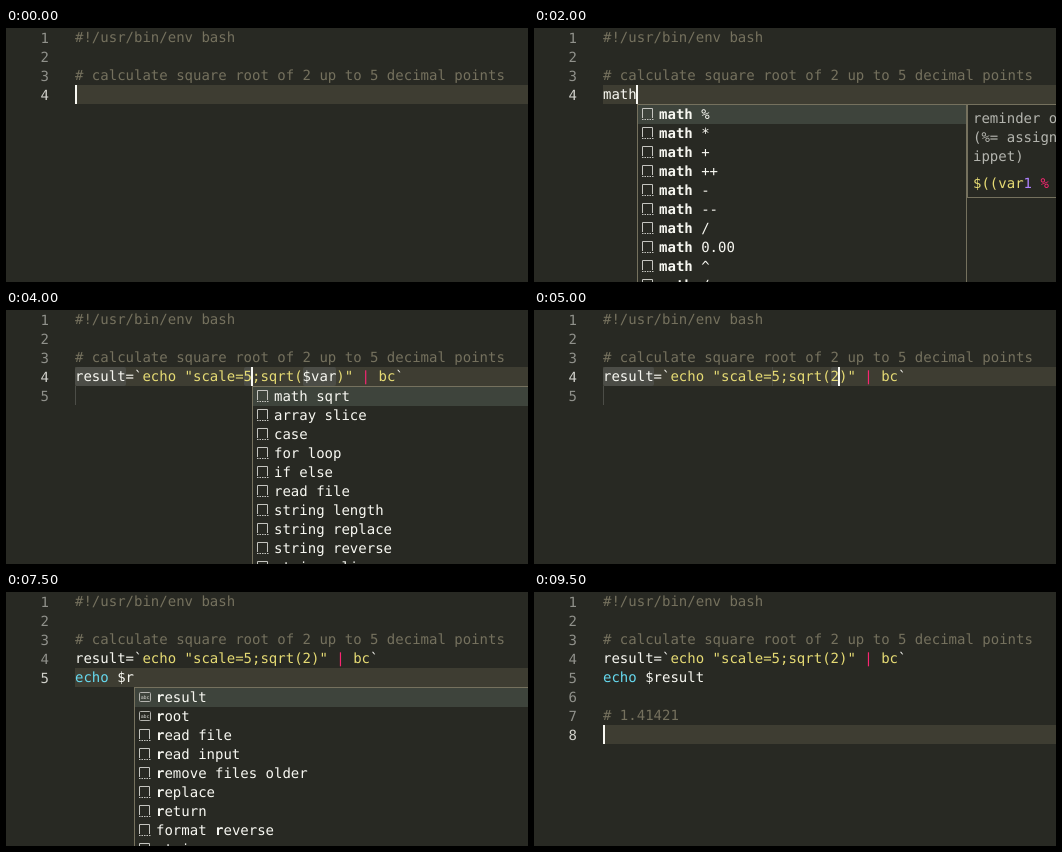
An HTML page for the animation above (10 s loop, 522x254 px).

```html
<!DOCTYPE html>
<html lang="en">
<head>
<meta charset="utf-8">
<title>Shell snippets in an editor</title>
<style>
html, body { margin: 0; width: 100%; height: 100%; overflow: hidden; background: #282923; }
svg { display: block; }
text { font: 14px "DejaVu Sans Mono", monospace; white-space: pre; text-rendering: geometricPrecision; }
</style>
</head>
<body>
<svg id="stage" width="522" height="254" viewBox="0 0 522 254"></svg>
<script>
const stage = document.getElementById('stage');
const LOOP = 10000, STEP = 500, ROW = 19, LEFT = 69, CHAR = 8.428;
const C = {
  bg: '#282923', line: '#3e3d32', white: '#f8f8f2', grey: '#75715e', num: '#90918b',
  active: '#d0d0ca', yellow: '#e6db74', pink: '#f92672', blue: '#66d9ef', purple: '#ae81ff',
  select: '#656660', field: '#4c4d47', pick: '#3e443c', border: '#75715e', hint: '#b4b5af'
};

const esc = s => s.replace(/&/g, '&amp;').replace(/</g, '&lt;');
const colX = n => LEFT + n * CHAR;
const rowY = n => (n - 1) * ROW;
const rect = (x, y, w, h, fill, extra = '') =>
  `<rect x="${x}" y="${y}" width="${w}" height="${h}" fill="${fill}" ${extra}/>`;
const frame = (x, y, w, h) =>
  rect(x + .5, y + .5, w - 1, h - 1, C.bg, `stroke="${C.border}"`);

// parts alternate: colour name, text, colour name, text ...
function text(x, y, parts) {
  let out = '';
  for (let i = 0; i < parts.length; i += 2) {
    out += `<tspan fill="${C[parts[i]]}">${esc(parts[i + 1])}</tspan>`;
  }
  return `<text x="${x}" y="${y}">${out}</text>`;
}

// Typed letters are bold, preferring the start of a word.
function boldMatch(label, typed) {
  const start = typed ? Math.max(0, label.search(new RegExp('\\b' + typed.slice(0, 2)))) : 0;
  let k = 0;
  return [...label].map((ch, i) =>
    i >= start && k < typed.length && ch === typed[k]
      ? (k++, `<tspan font-weight="700">${esc(ch)}</tspan>`) : esc(ch)).join('');
}

function icon(x, y, word) {
  if (word) {
    return `<rect x="${x + .5}" y="${y + .5}" width="11" height="9" rx="1" fill="none" stroke="#b5b5b0"/>` +
      `<text x="${x + 1.8}" y="${y + 7}" fill="#d0d0cb" style="font-size:5px;letter-spacing:-.2px">abc</text>`;
  }
  return `<path d="M${x + .5} ${y + 10}V${y + .5}H${x + 10.5}V${y + 10}" fill="none" stroke="#c5c5c0"/>` +
    `<path d="M${x} ${y + 11.5}H${x + 12}" stroke="#c5c5c0" stroke-dasharray="1.5 1"/>`;
}

// A label that starts with "@" is a plain word, the others are snippets.
function popup({ row, col, typed, items, width = 330, info }) {
  const x = Math.round(colX(col)), y = rowY(row + 1);
  let out = frame(x, y, width, items.length * ROW);
  out += rect(x + 1, y + 1, width - 2, ROW, C.pick);
  items.forEach((item, i) => {
    const word = item[0] === '@', top = y + i * ROW;
    out += icon(x + 5, top + (word ? 5 : 4), word) +
      `<text x="${x + 22}" y="${top + 15}" fill="${C.white}">${boldMatch(word ? item.slice(1) : item, typed)}</text>`;
  });
  if (info) {
    const px = x + width, n = info.about.length;
    out += frame(px, y, 330, n * ROW + 37);
    info.about.forEach((s, i) => { out += text(px + 6, y + 19 + i * ROW, ['hint', s]); });
    out += text(px + 6, y + 27 + n * ROW, info.code);
  }
  return out;
}

const head = [['grey', '#!/usr/bin/env bash'], [], ['grey', '# calculate square root of 2 up to 5 decimal points']];
const calc = (scale, arg, argColor = 'yellow') => [
  'white', 'result=`', 'yellow', `echo "scale=${scale};sqrt(`, argColor, arg,
  'yellow', ')" ', 'pink', '|', 'yellow', ' bc', 'white', '`'];
const show = name => ['blue', 'echo ', 'white', name];

const mathItems = ['%', '*', '+', '++', '-', '--', '/', '0.00', '^', '√'].map(s => 'math ' + s);
mathItems[9] = 'math √'.replace('√', '/=');
const modulo = {
  about: ['reminder of division', '(%= assignment) (sn', 'ippet)'],
  code: ['yellow', '$((var', 'purple', '1', 'yellow', ' ', 'pink', '%', 'yellow', ' var', 'purple', '2', 'yellow', '))']
};
const root = { about: ['square root', '(snippet)'], code: ['yellow', 'result=`echo'] };
const rest = ['string length', 'string replace', 'string reverse', 'string slice'];

const resultField = [4, 0, 6, 'field'], lastStop = [5, 0, 0, 'field'];
const final = calc('5', '2');

// One scene per half second; marks are [row, column, length, colour].
function scene(step) {
  if (step < 5) {
    const typed = 'maths'.slice(0, step);
    return {
      lines: [...head, ['white', typed]], row: 4, lit: true, caret: step,
      menu: step && { col: step, typed, items: mathItems, info: modulo }
    };
  }
  if (step === 5) {
    return {
      lines: [...head, ['white', 'maths']], row: 4, lit: true, caret: 5,
      menu: { col: 5, typed: 'maths', items: ['math sqrt'], info: root }
    };
  }
  if (step < 11) {
    const scale = step < 8 ? '0' : '5', arg = step < 10 ? '$var' : '2';
    const marks = [
      step === 6 ? [4, 0, 6, 'select'] : resultField,
      [4, 20, step < 9 ? 1 : 0, step === 7 ? 'select' : 'field'],
      [4, 27, arg.length, 'field'], lastStop];
    const items = step === 7
      ? ['math 0.00', 'if file', 'for loop', 'function', 'while loop', 'until loop']
      : ['math sqrt', 'array slice', 'case', 'for loop', 'if else', 'read file'];
    return {
      lines: [...head, calc(scale, arg, step < 10 ? 'white' : 'yellow'), []],
      row: 4, lit: step > 7, marks,
      caret: step === 8 ? 21 : step === 10 ? 28 : null,
      menu: (step === 7 || step === 8) && { col: 21, typed: '', items: [...items, ...rest] }
    };
  }
  if (step === 11) {
    return {
      lines: [...head, final, ['white', 'e']], row: 5, lit: true, caret: 1,
      menu: { col: 1, typed: 'e', width: 430,
        items: ['@echo', '@env', 'else', 'elif', 'exit', 'export', 'expr', 'eval', 'exec'] }
    };
  }
  if (step < 19) {
    const n = Math.max(0, step - 13), name = step < 14 ? '' : step === 18 ? '$result' : '$result'.slice(0, n);
    const found = [
      ['@result', '@root', 'read file', 'read input', 'remove files older', 'replace', 'return', 'format reverse', 'string reverse'],
      ['@result', 'read file', 'read input', 'remove files older', 'replace', 'return', 'format reverse', 'string reverse', 'string replace'],
      ['@result', 'remove files older', 'format reverse', 'string reverse']][step - 15];
    return {
      lines: [...head, final, show(name)], row: 5, lit: true,
      caret: step === 16 ? 8 : step === 18 ? 12 : null,
      menu: found && { col: 5 + n, typed: name.slice(1), items: found, width: 420 }
    };
  }
  return {
    lines: [...head, final, show('$result'), [], ['grey', '# 1.41421'], []],
    row: 8, lit: true, caret: 0
  };
}

function draw(step) {
  const s = scene(step);
  let out = rect(0, 0, 522, 254, C.bg);
  if (s.lit) out += rect(LEFT, rowY(s.row), 522 - LEFT, ROW, C.line);
  for (const [row, col, len, fill] of s.marks || []) {
    const x = Math.round(colX(col)), w = len ? Math.round(colX(col + len)) - x : 1;
    out += rect(x, rowY(row), w, ROW, C[fill], len ? 'rx="2"' : '');
  }
  s.lines.forEach((parts, i) => {
    const n = i + 1;
    out += text(34.5, rowY(n) + 15, [n === s.row ? 'active' : 'num', String(n)]);
    out += text(LEFT, rowY(n) + 14, parts);
  });
  if (s.menu) out += popup({ row: s.row, ...s.menu });
  if (s.caret != null) out += rect(Math.floor(colX(s.caret)), rowY(s.row), 2, ROW, C.white);
  stage.innerHTML = out;
}

let shown = -1;
function tick() {
  const step = Math.floor(performance.now() % LOOP / STEP);
  if (step !== shown) draw(shown = step);
  requestAnimationFrame(tick);
}
tick();
</script>
</body>
</html>
```
